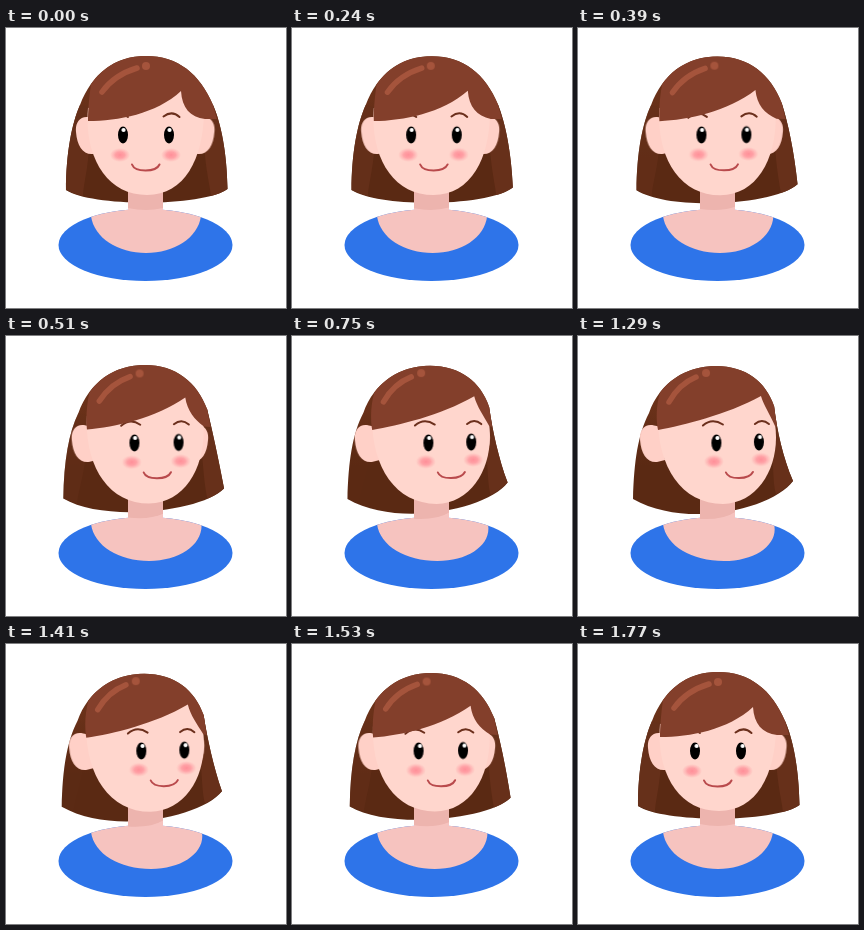
An HTML page that plays this animation: 280 by 280 pixels, repeating every 2270 ms.

```html
<!DOCTYPE html>
<html lang="en">
<head>
<meta charset="utf-8">
<title>Turning head</title>
<style>
  html, body { margin: 0; width: 100%; height: 100%; overflow: hidden; background: #fff; }
  svg { display: block; width: 100vw; height: 100vh; }

  /* --front and --side are the two ends of the head turn */
  .morph { d: var(--front); animation: morph 2270ms infinite; }
  .move { animation: move 2270ms infinite; }
  .fade { animation: morph 2270ms infinite, fade 2270ms infinite; }
  .morph, .move, .fade { animation-timing-function: cubic-bezier(.5, 0, .5, 1); }

  @keyframes morph {
    0%, 78%, 100% { d: var(--front); }
    43.6%, 55.7% { d: var(--side); }
  }
  @keyframes move {
    0%, 78%, 100% { transform: none; }
    43.6%, 55.7% { transform: var(--side); }
  }
  @keyframes fade {
    0%, 78%, 100% { opacity: 1; }
    43.6%, 55.7% { opacity: 0; }
  }

  .back {
    --front: path("M60 162 C60 125 66 95 74 77 C86 46 108 28 140 28 C172 28 194 46 207 77 C215 95 221 125 221.5 161 C197 179 85 179 60 162 Z");
    --side: path("M55 163 C56 125 60 98 71 77 C82 46 108 30 138 30 C168 30 188 46 196 70 C199 95 205 122 215 145 C196 172 110 194 55 163 Z");
  }
  .strand-left {
    --front: path("M83 80 L74 77 C66 95 60 125 60 162 Q68 166 77 168 C78 150 86 130 83 80 Z");
    --side: path("M80 80 L71 77 C60 98 56 125 55 163 Q60 165 66 167 C68 150 80 130 80 80 Z");
  }
  .strand-right {
    --front: path("M198 80 L207 77 C215 95 221 125 221.5 161 Q214 166 205 168 C203 150 196 130 198 80 Z");
    --side: path("M190 80 L196 70 C199 95 205 122 215 145 Q206 154 198 158 C194 145 197 130 190 80 Z");
  }
  .chest {
    --front: path("M85 188 C88 210 112 225 140 225 C168 225 192 210 195 188 V170 H85 Z");
    --side: path("M85 188 C88 210 114 225 146 225 C178 225 201 208 196 188 V170 H85 Z");
  }
  .face {
    --front: path("M82 80 C78 128 100 167 141 167 C179 167 197 130 198 85 L175 60 Z");
    --side: path("M80 80 C79 128 102 168 145 168 C182 167 203 128 197 88 L183 58 Z");
  }
  .bangs {
    --front: path("M82 93 C112 93 150 86 175 63 C176 80 184 89 199 91 L211 91 L207 77 C194 46 172 28 140 28 C116 28 97.6 38.1 84.9 56.3 C83 70 82 84 82 93 Z");
    --side: path("M80 94 C106 89 148 79 183 60 C186 70 192 78 197 90 L199 91 L196 70 C188 46 168 30 138 30 C115.5 30 95.2 39 82 56.6 C78 70 78 84 80 94 Z");
  }
  .shine {
    --front: path("M96 64 Q108 47 131 40");
    --side: path("M91 66 Q101 48 118 41");
  }
  .neck-shade {
    --front: path("M122 150 H157 V180 Q140 184 122 180 Z");
    --side: path("M122 150 H157 V176 Q146 184 122 183 Z");
  }
  .brow-left {
    --front: path("M104 90 Q113 82 122 89");
    --side: path("M125 89.5 Q134 81.5 145 88.5");
  }
  .brow-right {
    --front: path("M157.5 88.5 Q166 82 173.5 89");
    --side: path("M177 88 Q184 82 191 88");
  }
  .mouth {
    --front: path("M126 136.5 C129 144.5 150 144.5 153.5 136.5");
    --side: path("M148 136.5 C151 144 171 144 175 136");
  }
  .line { fill: none; stroke-linecap: round; stroke-width: 2; }
</style>
</head>
<body>
<svg viewBox="0 0 280 280">
  <defs>
    <linearGradient id="hair" gradientUnits="userSpaceOnUse" x1="0" y1="70" x2="0" y2="130">
      <stop stop-color="#6a3119"/>
      <stop offset="1" stop-color="#5a2913"/>
    </linearGradient>
    <radialGradient id="blush">
      <stop stop-color="#ff8f98"/>
      <stop offset=".45" stop-color="#ff979e" stop-opacity=".85"/>
      <stop offset="1" stop-color="#ffa3a8" stop-opacity="0"/>
    </radialGradient>
    <clipPath id="torso"><ellipse cx="139.5" cy="217" rx="87" ry="36"/></clipPath>
    <path id="ear" d="M92 91 L84 89.5 C74 87 69 95 70 104 C71 118 77 127 87 126 L95 124 Z" fill="#ffd0c7"/>
    <g id="eye">
      <ellipse rx="5" ry="8.5" fill="#000"/>
      <circle class="move" style="--side: translate(2px, 0)" cx=".5" cy="-5" r="2.1" fill="#fff"/>
    </g>
  </defs>

  <path class="back morph" fill="url(#hair)"/>
  <path class="strand-left morph fade" fill="#66301a"/>
  <path class="strand-right morph" fill="#67301a"/>

  <ellipse cx="139.5" cy="217" rx="87" ry="36" fill="#2e74e9"/>
  <g clip-path="url(#torso)"><path class="chest morph" fill="#f6c3bf"/></g>
  <path d="M122 150 H157 V192 H122 Z" fill="#f6c3bf"/>
  <path class="neck-shade morph" fill="#edb4ae"/>

  <g class="move" style="--side: translate(-8px, 0)"><use href="#ear"/></g>
  <g class="move" style="--side: translate(-12px, 0)"><use href="#ear" transform="translate(278.5) scale(-1 1)"/></g>
  <path class="face morph" fill="#ffd6cd"/>

  <g class="line" stroke="#6b2f1c">
    <path class="brow-left morph"/>
    <path class="brow-right morph"/>
  </g>
  <ellipse class="move" style="--side: translate(22px, -1.5px)" cx="114" cy="127" rx="10" ry="7" fill="url(#blush)"/>
  <ellipse class="move" style="--side: translate(18px, -3.5px)" cx="165" cy="127" rx="10" ry="7" fill="url(#blush)"/>
  <g class="move" style="--side: translate(21.5px, 0)"><use href="#eye" x="117" y="107"/></g>
  <g class="move" style="--side: translate(18px, -1px)"><use href="#eye" x="163" y="107"/></g>
  <path class="mouth morph line" stroke="#b94a4c"/>

  <path class="bangs morph" fill="#833f2b"/>
  <path class="shine morph line" stroke="#a5543c" style="stroke-width: 5.5px"/>
  <circle class="move" style="--side: translate(-12px, -1px)" cx="140" cy="38" r="4" fill="#a5543c"/>
</svg>
</body>
</html>
```
